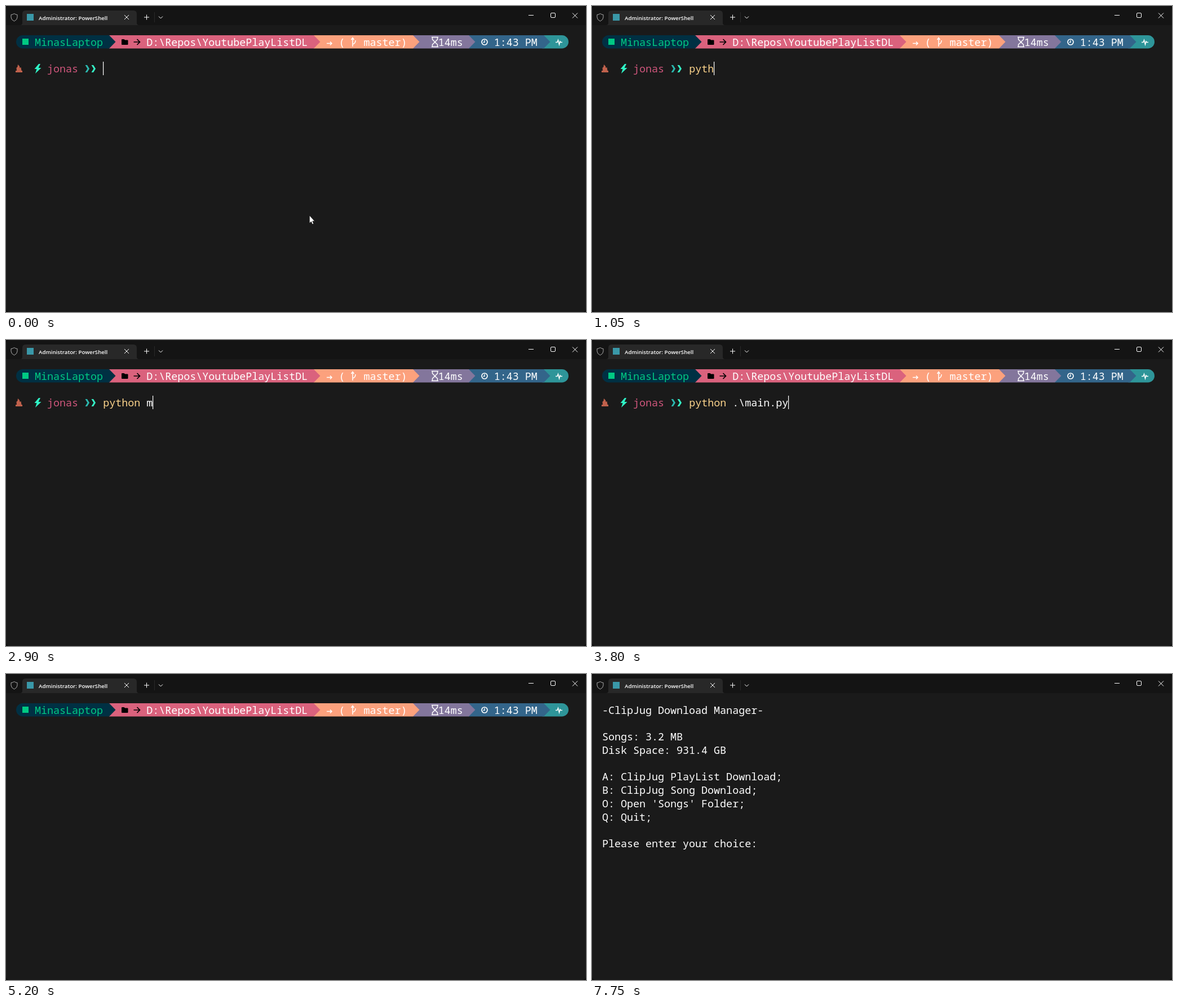
These frames come from a looping animation (1029x544 px, 8 s). An HTML page:

```html
<!DOCTYPE html>
<html lang="en">
<head>
<meta charset="utf-8">
<title>Terminal session</title>
<style>
  html, body { margin: 0; width: 100%; height: 100%; overflow: hidden; background: #0c0c0c; }
  svg { display: block; width: 1029px; height: 544px; }
  text { white-space: pre; font: 18.35px "Noto Sans Mono", "DejaVu Sans Mono", monospace; fill: #fff; }
  .title { font: 600 9.7px "Open Sans", "Noto Sans", sans-serif; }
  .line { fill: none; stroke: #fff; }
</style>
</head>
<body>
<svg viewBox="0 0 1029 544">
  <!-- window -->
  <rect width="1029" height="544" rx="7" fill="#141414"/>
  <path d="M0 34H1029V537a7 7 0 0 1-7 7H7a7 7 0 0 1-7-7Z" fill="#1a1a1a"/>
  <path d="M25 34q4 0 4-4V14q0-6 6-6H226q6 0 6 6V30q0 4 4 4Z" fill="#282828"/>
  <path d="M14.5 13.5q2.5 2 5.5 2v4.500q0 4.500-5.500 7q-5.500-2.500-5.500-7v-4.500q3 0 5.500-2Z" fill="none" stroke="#aaa"/>
  <rect x="37" y="14" width="12" height="12" fill="#3a98a8"/>
  <text class="title" x="58" y="24.500">Administrator: PowerShell</text>
  <path class="line" d="M210 16l8 8m0-8l-8 8M245 20h9m-4.500-4.500v9M271 18.500l3.500 3.500 3.500-3.500M927 16.500h9M1005 12.500l9 9m0-9l-9 9"/>
  <path d="M263.500 11v18" stroke="#2a2a2a"/>
  <rect class="line" x="966.500" y="12.500" width="8" height="8" rx="1.500"/>

  <g id="shell">
    <g id="bar"></g>
    <rect x="29" y="58" width="11" height="11" fill="#00c983"/>
    <path d="M205 60q0-1 1-1h3.500l1.500 1.500h4.500q1 0 1 1V68q0 1-1 1H206q-1 0-1-1Z"/>
    <path d="M226.500 64h11m-5-5l5 5-5 5" fill="none" stroke="#000" stroke-width="1.700"/>
    <path class="line" stroke-width="1.500" d="M569 66.500h9m-3-3l3 3-3 3M615 57v15M615 68q5-1 5-7m-7.500-1l2.500-3.500 2.500 3.500"/>
    <path class="line" stroke-width="1.500" d="M755 55.500h12M755 72.500h12M756.500 56v3.500l4.500 4.500 4.500-4.500V56M756.500 72v-3.500l4.500-4.500 4.500 4.500V72"/>
    <circle class="line" cx="849" cy="64" r="5" stroke-width="1.700"/>
    <path class="line" stroke-width="1.300" d="M849 60.500V64.500h-2.500"/>
    <path class="line" stroke-width="1.500" d="M975 64.500h3l1.500-4 2 8 1.500-5.500 1 1.500h3"/>

    <g id="prompt">
      <path d="M17 118v-3h2l-.5-5 2-2 .5-4 3 3 .5 3 2-1 1 6h1.500v3Z" fill="#c0614c"/>
      <path d="M58 103l-7.500 9h4l-2.500 8 10.500-10h-5l3.500-7Z" fill="#2ff5c6"/>
      <path d="M140.500 105h3.500l4 6.500-4 6.500h-3.500l4-6.500Z" fill="#2bb7ae"/>
      <path d="M151.500 105h3.500l4 6.500-4 6.500h-3.500l4-6.500Z" fill="#35f3c5"/>
      <text id="command" y="118" style="fill:#fbd38b"></text>
      <text id="argument" y="118"></text>
    </g>
  </g>
  <g id="menu"></g>
  <rect id="caret" width="1.200" height="24" fill="#fff"/>
  <path id="mouse" d="M538.500 372.500v13.500l3-2.800 2 4.800 2.200-1-2-4.600h3.800Z" fill="#fff" stroke="#000" stroke-width=".5"/>
</svg>
<script>
const $ = id => document.getElementById(id);
const colX = col => 18 + col * 11.01;
const rowY = row => 70.5 + row * 23.75;

function make(parent, tag, attrs, content = '') {
  const el = document.createElementNS('http://www.w3.org/2000/svg', tag);
  for (const name in attrs) el.setAttribute(name, attrs[name]);
  el.textContent = content;
  return parent.appendChild(el);
}
const write = (parent, col, row, content, fill = '#fff') =>
  make(parent, 'text', { x: colX(col), y: rowY(row), style: `fill:${fill}` }, content);
const show = (id, on) => $(id).style.display = on ? '' : 'none';

// Status bar, drawn right to left so that each tip covers its neighbour
make($('bar'), 'rect', { x: 942, y: 52, width: 56, height: 23.5, rx: 11.75, fill: '#2e9599' });
[[821, 954, '#33658a'], [722, 821, '#83769c'], [546, 722, '#fca17d'], [183, 546, '#da627d']]
  .forEach(([from, to, fill]) =>
    make($('bar'), 'path', { d: `M${from} 52H${to}l11.500 11.750L${to} 75.500H${from}Z`, fill }));
make($('bar'), 'path', { d: 'M29.750 52H183l11.500 11.750L183 75.500H29.750a11.750 11.750 0 0 1 0-23.500Z', fill: '#003043' });

write($('shell'), 3, 0, 'MinasLaptop', '#00c983');
write($('shell'), 21, 0, 'D:\\Repos\\YoutubePlayListDL');
write($('shell'), 52, 0, '(');
write($('shell'), 56, 0, 'master)');
write($('shell'), 68, 0, '14ms');
write($('shell'), 77, 0, '1:43 PM');
write($('prompt'), 5, 2, 'jonas', '#cf567c');
$('command').setAttribute('x', colX(14));
$('argument').setAttribute('x', colX(20));

[
  '-ClipJug Download Manager-', '',
  'Songs: 3.2 MB', 'Disk Space: 931.4 GB', '',
  'A: ClipJug PlayList Download;', 'B: ClipJug Song Download;',
  "O: Open 'Songs' Folder;", 'Q: Quit;', '',
  'Please enter your choice: '
].forEach((line, row) => write($('menu'), 0, row, line));

// Typed text and caret visibility from each moment on
const full = 'python .\\main.py';
const typing = [
  [0, '', 1], [150, '', 0], [450, 'p', 1], [750, 'py', 1], [900, 'pyt', 1],
  [1050, 'pyth', 1], [1350, 'pytho', 1], [1650, 'python', 1], [2000, 'python ', 1],
  [2550, 'python ', 0], [2900, 'python m', 1], [3100, 'python ma', 1],
  [3250, 'python mai', 1], [3800, full, 1], [4400, full, 0], [4900, full, 1]
];
const between = (t, from, to) => t >= from && t < to;

function draw(now) {
  const t = now % 8000;
  const [, typed, caretOn] = typing.findLast(step => step[0] <= t);
  const prompt = t < 5200, menu = t >= 6000;
  $('command').textContent = typed.slice(0, 6);
  $('argument').textContent = typed.slice(6);
  show('shell', !menu);
  show('prompt', prompt);
  show('menu', menu);
  show('mouse', t < 400);

  const col = prompt ? 14 + typed.length : menu ? 26 : 0;
  $('caret').setAttribute('x', Math.floor(colX(col)));
  $('caret').setAttribute('y', rowY(menu ? 10 : 2) - 19);
  show('caret', prompt ? caretOn
    : between(t, 5250, 5800) || between(t, 6250, 6800) || between(t, 7300, 7750));
}

const start = performance.now();
function tick() {
  draw(performance.now() - start);
  requestAnimationFrame(tick);
}
tick();
</script>
</body>
</html>
```
